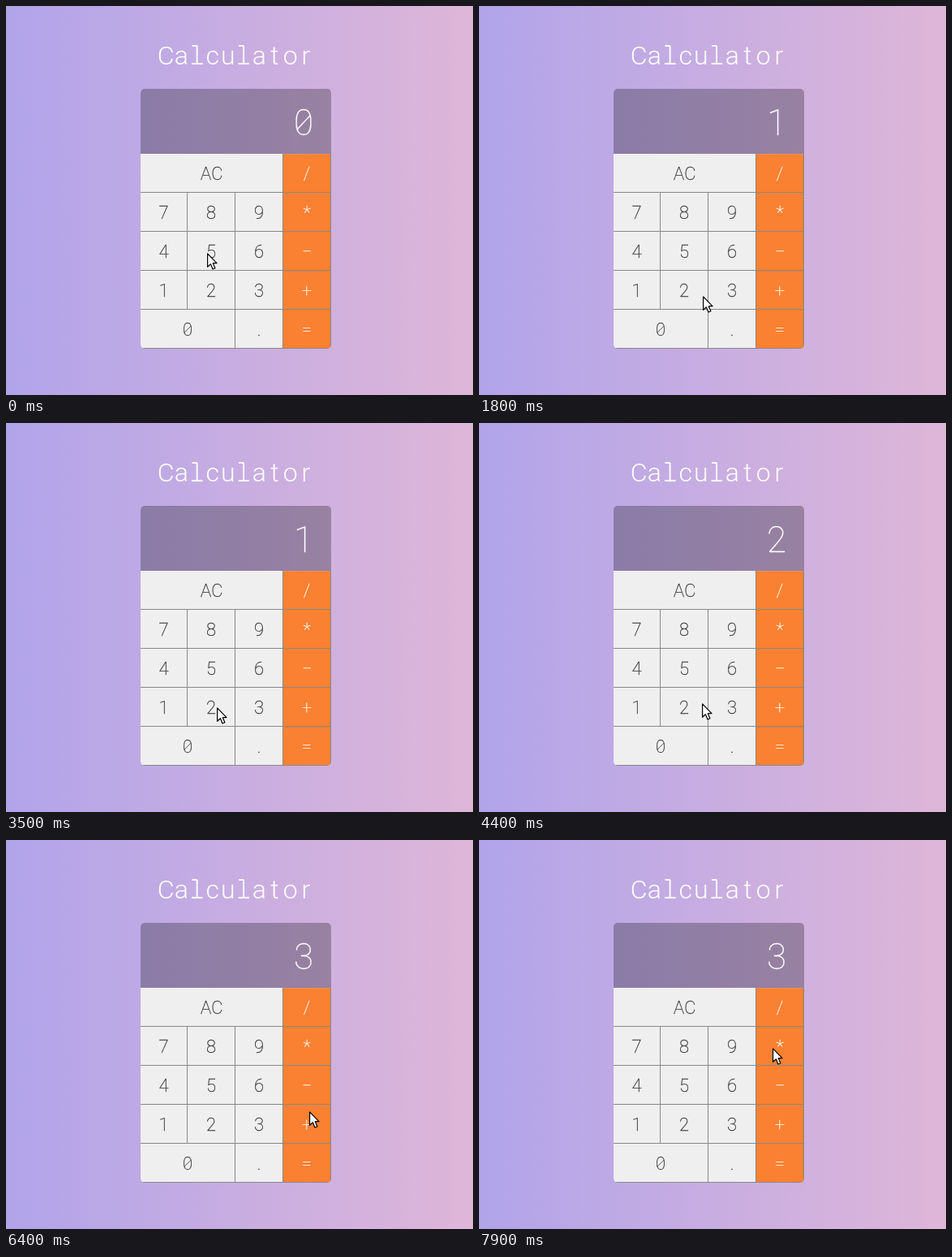
Write an HTML page that moves like this. It is 576 px wide and 479 px high and loops after 8 s.

```html
<!DOCTYPE html>
<html lang="en">
<head>
<meta charset="utf-8">
<title>Calculator</title>
<style>
  html, body { margin: 0; width: 100%; height: 100%; overflow: hidden; }
  svg { display: block; width: 576px; height: 479px; background: linear-gradient(to right, #b1a4ea, #deb6d8); }
  text { font-family: Roboto, "Noto Sans", sans-serif; text-anchor: middle; }
  .title { font-size: 32px; font-weight: 300; fill: #fff; }
  .thin { font-weight: 100; stroke-width: .3; }
  .label { font-size: 22px; fill: #333; stroke: #333; }
  .op { fill: #fff; stroke: #fff; }
  .value { font-size: 44px; fill: #fff; stroke: #fff; }
</style>
</head>
<body>
<svg id="stage" viewBox="0 0 576 479">
  <defs>
    <clipPath id="body"><rect x="166" y="102" width="235" height="320" rx="5"/></clipPath>
  </defs>
  <text id="title" class="title" y="72"></text>
  <path id="slabs" fill="none" stroke="#fff" stroke-width="1.9"/>
  <g clip-path="url(#body)">
    <rect x="166" y="102" width="235" height="80" fill="#000" fill-opacity=".27"/>
    <rect x="166" y="182" width="235" height="240" fill="#888"/>
    <g id="keys"></g>
    <path d="M342 182.5H400" stroke="#c9a58c" stroke-dasharray="1 1"/>
  </g>
  <text id="value" class="value thin" x="367" y="158.7"></text>
  <path id="slash" d="M359.5 151.5L375.5 134.5" stroke="#fff" stroke-width="1.3"/>
  <path id="cursor" d="M.6 .9V17.3L4.4 13.8L7 20L9.9 18.8L7.3 12.7H12Z" fill="#fff" stroke="#000" stroke-width="1.2" stroke-linejoin="round"/>
</svg>
<script>
const LOOP = 8000, STEP = 100;
const $ = id => document.getElementById(id);

function add(parent, tag, attrs, content = "") {
  const el = document.createElementNS("http://www.w3.org/2000/svg", tag);
  for (const name in attrs) el.setAttribute(name, attrs[name]);
  el.textContent = content;
  parent.append(el);
  return el;
}

// The heading sits on a monospaced grid; each "l" gets its slabs.
const heading = "Calculator";
const centers = [...heading].map((_, i) => 187.5 + 19.2 * (i + .5));
$("title").textContent = heading;
$("title").setAttribute("x", centers.join(" "));
$("slabs").setAttribute("d", centers.filter((_, i) => heading[i] === "l")
  .map(x => `M${x - 6} 49H${x}M${x - 6.5} 71H${x + 7}`).join(""));

const columns = [166, 224, 283, 342, 401];
const rows = [
  [["AC", 3], ["/", 1]],
  [["7", 1], ["8", 1], ["9", 1], ["*", 1]],
  [["4", 1], ["5", 1], ["6", 1], ["−", 1]],
  [["1", 1], ["2", 1], ["3", 1], ["+", 1]],
  [["0", 2], [".", 1], ["=", 1]]
];
const keys = {};

rows.forEach((row, r) => {
  let col = 0;
  const y = 182 + 48 * r;
  for (const [label, span] of row) {
    const x = columns[col], isOp = col === 3;
    const width = columns[col += span] - x - 1;
    const mid = x + width / 2;
    const [fill, pressed] = isOp ? ["#f98131", "#e0742c"] : ["#efefef", "#d6d6d6"];
    const rect = add($("keys"), "rect", { x, y, width, height: 47, fill });
    keys[label] = { rect, fill, pressed };
    add($("keys"), "text", {
      class: "label thin" + (isOp ? " op" : ""),
      x: label === "AC" ? `${mid - 7} ${mid + 7}` : mid,
      y: y + 32
    }, label);
    if (label === "0") {
      add($("keys"), "path", {
        d: `M${mid - 4.2} ${y + 28.3}L${mid + 4.2} ${y + 20}`,
        stroke: "#333", "stroke-width": .8
      });
    }
  }
});

// Pointer stops: time, x, y
const path = [
  [200, 248, 304], [900, 206, 347],
  [1500, 206, 347], [1800, 276, 357], [2300, 371, 365],
  [2400, 371, 365], [2500, 372, 365],
  [2800, 372, 365], [3500, 260, 350],
  [4300, 260, 350], [4400, 275, 345], [4500, 292, 343], [5100, 366, 386],
  [6000, 366, 386], [6900, 383, 269], [7000, 380, 265], [7300, 370, 248],
  [7800, 370, 248], [7900, 362, 256]
];
const presses = [["+", 2500, 2700], ["2", 3900, 4000], ["=", 5400, 5500], ["*", 7600, 7700]];
const values = [[0, "0"], [1300, "1"], [4000, "2"], [5500, "3"]];

function pointerAt(t) {
  const next = path.findIndex(stop => stop[0] > t);
  if (next === 0) return path[0].slice(1);
  if (next < 0) return path[path.length - 1].slice(1);
  const [t0, x0, y0] = path[next - 1], [t1, x1, y1] = path[next];
  const p = (t - t0) / (t1 - t0);
  return [x0 + (x1 - x0) * p, y0 + (y1 - y0) * p].map(Math.round);
}

function render(time) {
  const t = Math.floor((time % LOOP) / STEP) * STEP;
  const value = values.filter(([start]) => start <= t).pop()[1];
  $("value").textContent = value;
  $("slash").setAttribute("visibility", value === "0" ? "visible" : "hidden");
  for (const [label, start, end] of presses) {
    const key = keys[label];
    key.rect.setAttribute("fill", t >= start && t < end ? key.pressed : key.fill);
  }
  $("cursor").setAttribute("transform", `translate(${pointerAt(t)})`);
}

const begin = performance.now();
function tick() {
  render(performance.now() - begin);
  requestAnimationFrame(tick);
}
tick();
</script>
</body>
</html>
```
